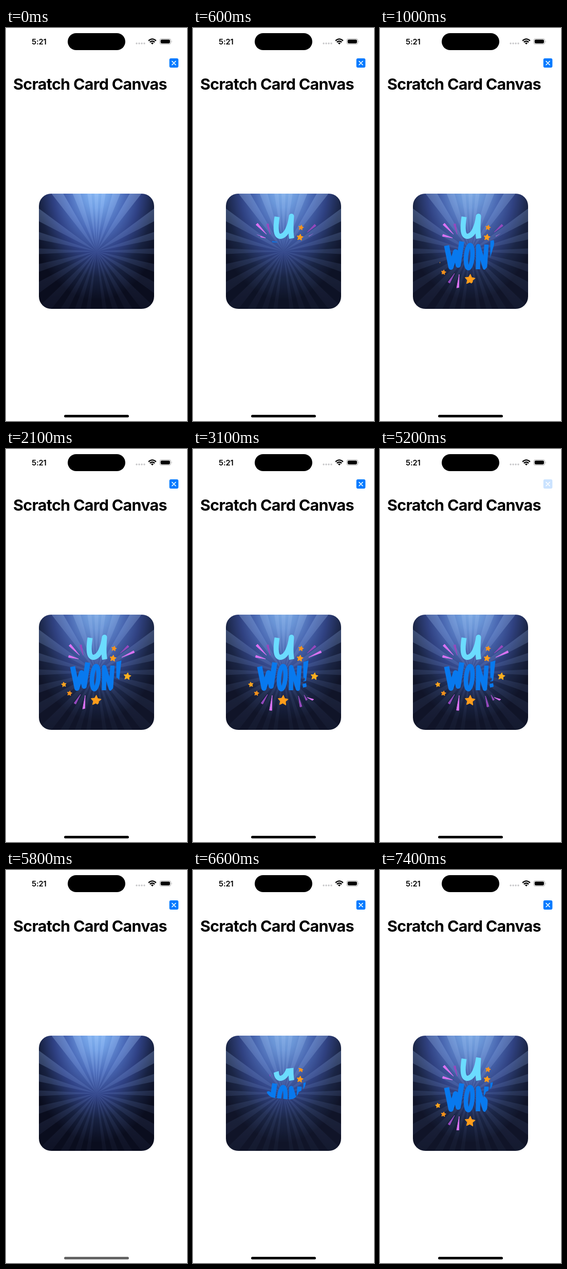
Recreate the animation shown at these times as an HTML page. Size 352x764 px, loop 8 s.

```html
<!DOCTYPE html>
<html lang="en">
<head>
<meta charset="utf-8">
<title>Scratch card</title>
<style>
  html, body { margin: 0; width: 100%; height: 100%; overflow: hidden; background: #fff; }
  svg { display: block; width: 352px; height: 764px; }
  text { font-family: Inter, "Liberation Sans", sans-serif; }
  .title { font-size: 30.5px; font-weight: 700; letter-spacing: -.72px; }
  .clock { font-size: 14.8px; font-weight: 600; letter-spacing: -.2px; text-anchor: middle; }
  .line { fill: none; stroke-linejoin: round; }
  #scratch path { fill: none; stroke: #fff; stroke-width: 36; stroke-linecap: round; stroke-linejoin: round; stroke-dasharray: 1 2; }
</style>
</head>
<body>
<svg viewBox="0 0 352 764">
  <defs>
    <radialGradient id="glow" gradientUnits="userSpaceOnUse" cx="0" cy="0" r="1" gradientTransform="translate(176 304) scale(142 226)">
      <stop offset="0" stop-color="#8fc0f8"/>
      <stop offset=".2" stop-color="#719fe4"/>
      <stop offset=".4" stop-color="#4c6cba"/>
      <stop offset=".6" stop-color="#2f4184"/>
      <stop offset=".8" stop-color="#172140"/>
      <stop offset="1" stop-color="#0a0d1e"/>
    </radialGradient>
    <linearGradient id="beam" gradientUnits="userSpaceOnUse" x1="0" y1="322" x2="0" y2="546">
      <stop offset="0" stop-color="#a9cdff" stop-opacity=".32"/>
      <stop offset=".45" stop-color="#8fb0f4" stop-opacity=".15"/>
      <stop offset="1" stop-color="#7f92d8" stop-opacity=".04"/>
    </linearGradient>
    <clipPath id="card"><rect x="64" y="322" width="224" height="224" rx="24"/></clipPath>
    <mask id="scratch" maskUnits="userSpaceOnUse" x="64" y="322" width="224" height="224"></mask>
  </defs>

  <rect width="352" height="764" fill="#fff"/>
  <text class="clock" x="64.3" y="31.5">5:21</text>
  <rect x="120" y="10" width="112" height="33" rx="16.5"/>
  <g fill="#c6c6c8">
    <circle cx="254" cy="30" r="1.7"/><circle cx="259" cy="30" r="1.7"/>
    <circle cx="264" cy="30" r="1.7"/><circle cx="269" cy="30" r="1.7"/>
  </g>
  <g fill="none" stroke="#000" stroke-width="2.3">
    <path d="M277.2 24.8Q284.5 18 291.8 24.8"/>
    <path d="M279.8 27.6Q284.5 23.4 289.2 27.6"/>
  </g>
  <path d="M281.8 29.3Q284.5 27.2 287.2 29.3L284.5 32Z"/>
  <rect x="299" y="20.9" width="21.6" height="10.6" rx="3.4" fill="none" stroke="#a8a8a8"/>
  <rect x="300.7" y="22.5" width="18.2" height="7.4" rx="2.1"/>
  <path d="M322 24.4q1.6 1.8 0 3.6z" fill="#a8a8a8"/>

  <g id="reset">
    <rect x="317.7" y="59" width="17.6" height="18" rx="3" fill="#007aff"/>
    <path d="M323 64.6l7 7m0-7l-7 7" stroke="#fff" stroke-width="1.5" stroke-linecap="round"/>
  </g>
  <text class="title" x="14" y="120">Scratch Card Canvas</text>

  <g clip-path="url(#card)">
    <rect x="64" y="322" width="224" height="224" fill="url(#glow)"/>
    <path id="beams" fill="url(#beam)"/>
    <rect id="tint" x="64" y="322" width="224" height="224" fill="#3a4a70"/>
    <g id="art">
      <g mask="url(#scratch)">
        <g id="bits"></g>
        <path class="line" stroke="#6bdcff" stroke-width="10" d="M163.5 367C160 390 161 405 170 405C182 404 189 384 191.5 366C190 385 190 399 192 409"/>
        <g class="line" stroke="#0879ee" stroke-width="10">
          <path d="M129.500 423L138 465L147 435L152 461L159 415"/>
          <ellipse cx="173.500" cy="444.500" rx="6.200" ry="22.500" stroke-width="8.500" transform="rotate(5 173.500 444.500)"/>
          <path d="M190.500 469L191 424L204 466L207 421" stroke-width="8.500"/>
        </g>
        <path fill="#0879ee" d="M214.500 414L224.500 411L220 451L214.500 452ZM213 457L220 455L221 462L214 464Z"/>
      </g>
    </g>
  </g>
  <rect id="home" x="113" y="752" width="126" height="5" rx="2.5"/>
</svg>

<script>
const NS = "http://www.w3.org/2000/svg";
const $ = id => document.getElementById(id);
const clamp = v => Math.max(0, Math.min(1, v));

function add(parent, d, attrs = {}) {
  const path = document.createElementNS(NS, "path");
  path.setAttribute("d", d);
  for (const key in attrs) path.setAttribute(key, attrs[key]);
  return parent.appendChild(path);
}

function polar(x, y, r, deg) {
  const a = deg * Math.PI / 180;
  return (x + r * Math.sin(a)).toFixed(1) + " " + (y - r * Math.cos(a)).toFixed(1);
}

// Light beams mirrored around the vertical axis: angle, half width
const beams = [[7, 2], [19, 3.5], [34, 4], [58, 4.5], [75, 3.5], [90, 2.8], [106, 3.6], [122, 4], [138, 4], [151, 3], [162, 2.6], [172, 2]];
const wedge = (a, w) => `M176 434L${polar(176, 434, 180, a - w)}L${polar(176, 434, 180, a + w)}Z`;
$("beams").setAttribute("d", wedge(0, 2) + beams.map(([a, w]) => wedge(a, w) + wedge(-a, w)).join(""));

function star(x, y, r, turn, fill) {
  const pts = Array.from({ length: 10 }, (_, i) => polar(x, y, i % 2 ? r * .5 : r, turn + i * 36));
  add($("bits"), "M" + pts.join("L") + "Z", { fill, stroke: fill, "stroke-width": 1, "stroke-linejoin": "round" });
}

// Streak that widens toward its outer end
function streak(x1, y1, x2, y2, w, fill) {
  const len = Math.hypot(x2 - x1, y2 - y1);
  const nx = (y1 - y2) / len * w / 2, ny = (x2 - x1) / len * w / 2;
  add($("bits"), `M${x1} ${y1}L${x2 + nx} ${y2 + ny}L${x2 - nx} ${y2 - ny}Z`, { fill, stroke: fill, "stroke-width": 1, "stroke-linejoin": "round" });
}

const pink = "#da72f2", violet = "#9549bd";
streak(143, 401, 124, 381, 4.5, pink);
streak(141, 408, 122, 403, 4, pink);
streak(150, 401, 145, 381, 4, violet);
streak(222, 397, 238, 383, 4, violet);
streak(225, 405, 249, 394, 4, pink);
streak(145, 477, 134, 495, 4, violet);
streak(154, 479, 151, 508, 4.5, pink);
streak(205, 480, 210, 501, 4, violet);
streak(216, 478, 221, 488, 3, violet);
streak(222, 483, 234, 488, 3, pink);

star(175, 489, 10.5, 4, "#ff9d1b");
star(210, 388, 5.2, 12, "#f39320");
star(208, 407, 6.5, 8, "#ff9d1b");
star(236, 442, 7.3, 8, "#ffb01f");
star(112.5, 458, 5, -8, "#ffa51e");
star(123.5, 475, 5, 10, "#f3921c");

// Finger strokes: start, end, path
const RESET = 5800;
const strokes = [
  [400, 1000, "M135 387L170 379L214 378L222 386L200 400L138 398L140 424L204 418L193 455L141 442L134 455L138 475L190 457L165 484L145 488"],
  [1000, 1300, "M145 488L140 475L125 458"],
  [1300, 1400, "M134 474L128 474"],
  [1900, 2300, "M236 402L224 428L240 442L226 472"],
  [2400, 2700, "M205 465L207 486L180 489"],
  [2800, 2900, "M168 496L160 499"],
  [3000, 3100, "M128 477L126 477"],
  [6300, 6600, "M160 412L185 404L203 402L201 414L160 425L188 428"],
  [6600, 7200, "M188 428L198 384L168 379L150 396L143 428L148 452L193 455L170 488L145 488L140 474"],
  [7200, 7400, "M140 474L125 460L138 435L135 387"]
].map(([from, to, d]) => ({ from, to, path: add($("scratch"), d, { pathLength: 1 }) }));

function draw(t) {
  for (const s of strokes) {
    const on = t > s.from && (t >= RESET) === (s.from >= RESET);
    s.path.style.display = on ? "" : "none";
    s.path.style.strokeDashoffset = 1 - clamp((t - s.from) / (s.to - s.from));
  }
  const fade = t < RESET ? 1 - clamp((t - 5300) / 500) : 1;
  const start = t < RESET ? 400 : 6300;
  $("art").style.opacity = fade;
  $("tint").style.opacity = .12 * fade * clamp((t - start) / 300);
  $("reset").style.opacity = t < 5200 ? 1 : t < 5400 ? .2 : .2 + .8 * clamp((t - 5300) / 300);
  const grey = t < 6400 ? Math.round(100 * clamp((t - 5400) / 400)) : 0;
  $("home").style.fill = `rgb(${grey},${grey},${grey})`;
}

const begin = performance.now();
function tick() {
  const t = (performance.now() - begin) % 8000;
  draw(Math.floor(t / 100) * 100);
  requestAnimationFrame(tick);
}
tick();
</script>
</body>
</html>
```
